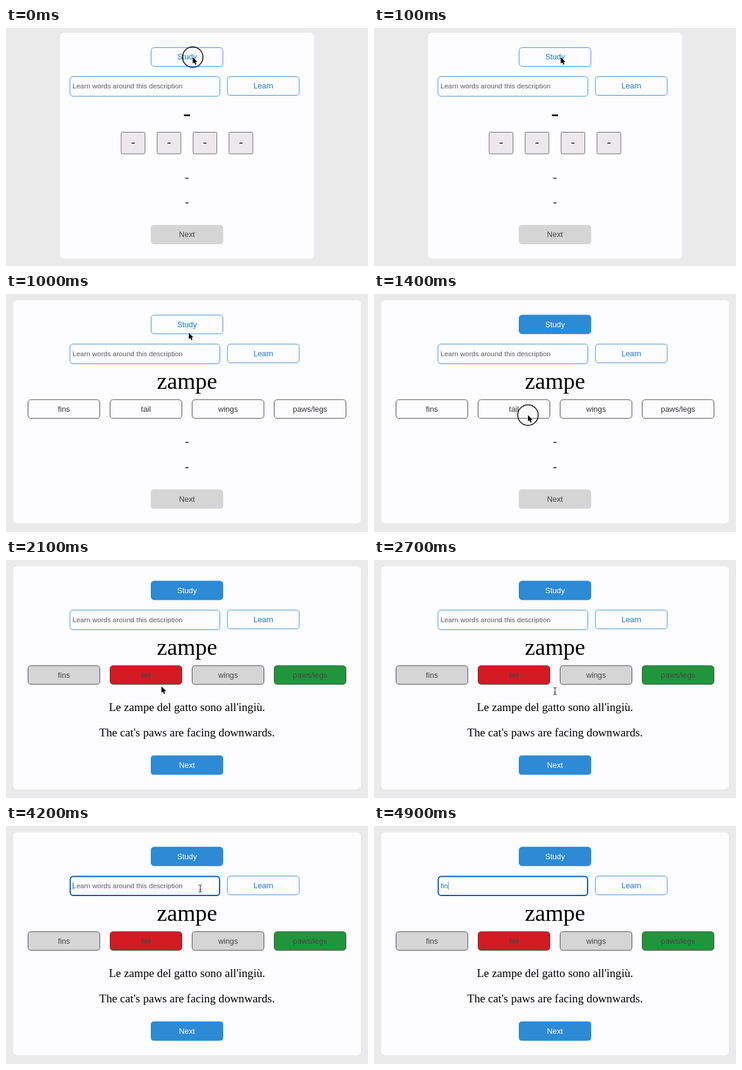
Animation of 600x394 px, one loop 5 s. Source, as an HTML page with a canvas:

```html
<!DOCTYPE html>
<html lang="en">
<head>
<meta charset="utf-8">
<title>Word study</title>
<style>
html, body { margin: 0; width: 100%; height: 100%; overflow: hidden; background: #ebeaeb; }
canvas { display: block; width: 600px; height: 394px; }
</style>
</head>
<body>
<canvas id="stage"></canvas>
<script>
const W = 600, H = 394, LOOP = 5000, STEP = 100;
const SANS = '"Liberation Sans", Arial, sans-serif';
const SERIF = '"Liberation Serif", Times, serif';
const BLUE = '#2d8ad4', LINK = '#1279ca', PAPER = '#fdfcfe', GREY = '#d6d5d6';
const INK = '#333', FADED = '#484648';

const canvas = document.getElementById('stage');
const ctx = canvas.getContext('2d');
const ratio = window.devicePixelRatio || 1;
canvas.width = W * ratio;
canvas.height = H * ratio;

// Moments in ms
const LOADED = 200, ANSWERED = 1500, FOCUSED = 4100, TYPING = 4700;
const CLICKS = [0, 1400, 4100];

// Pointer stops: time, x, y
const PATH = [
  [0, 309.5, 48.3], [500, 309.5, 48.3], [700, 308.5, 48.3], [900, 308.5, 48.3],
  [1400, 255.2, 200.5], [1500, 255.2, 200.5], [2100, 257.7, 209.3],
  [2700, 300, 217], [3400, 354, 221], [4100, 322, 103.5], [LOOP, 322, 103.5]
];

function pointerAt(t) {
  const i = Math.max(1, PATH.findIndex(p => p[0] >= t));
  const [t0, x0, y0] = PATH[i - 1], [t1, x1, y1] = PATH[i];
  const k = (t - t0) / (t1 - t0);
  const e = k * k * (3 - 2 * k);
  return { x: x0 + (x1 - x0) * e, y: y0 + (y1 - y0) * e };
}

function inside(p, x, y, w, h) {
  return p.x >= x && p.x <= x + w && p.y >= y && p.y <= y + h;
}

function box(x, y, w, h, r, fill, stroke, line = 1) {
  const d = stroke ? line / 2 : 0;
  ctx.beginPath();
  ctx.roundRect(x + d, y + d, w - 2 * d, h - 2 * d, r);
  if (fill) { ctx.fillStyle = fill; ctx.fill(); }
  if (stroke) { ctx.strokeStyle = stroke; ctx.lineWidth = line; ctx.stroke(); }
}

function label(text, x, y, size, family, color, align = 'center') {
  ctx.font = `${size}px ${family}`;
  ctx.fillStyle = color;
  ctx.textAlign = align;
  ctx.fillText(text, x, y);
}

function button(text, x, y, fill, stroke, color) {
  box(x, y, 120, 32, 5, fill, stroke);
  label(text, x + 60, y + 20.3, 12.8, SANS, color);
}

function drawInput(t, y) {
  const focused = t >= FOCUSED;
  box(105.5, y, 249.5, 33.5, 5, PAPER, focused ? '#0d58ae' : '#3a93da', focused ? 2 : 1);
  const typed = 'fin'.slice(0, Math.max(0, Math.floor((t - TYPING) / STEP) + 1));
  const base = y + 20.3;
  if (typed) label(typed, 110.3, base, 11.52, SANS, LINK, 'left');
  else label('Learn words around this description', 110.3, base, 11.52, SANS, '#5d5b5e', 'left');
  if (focused) {
    ctx.fillStyle = BLUE;
    ctx.fillRect(110.5 + (typed ? ctx.measureText(typed).width : 0), y + 10, 1, 13);
  }
}

function drawChoices(answered) {
  ['fins', 'tail', 'wings', 'paws/legs'].forEach((word, i) => {
    const x = 36 + i * 136;
    const fill = answered ? [GREY, '#d41a22', GREY, '#20963c'][i] : PAPER;
    button(word, x, 174.4, fill, '#4b494b', answered ? FADED : INK);
    if (answered && i === 1) {
      const w = ctx.measureText(word).width;
      ctx.fillRect(x + 60 - w / 2, 190.4, w, 1);
    }
  });
}

function drawPage(t, pointer) {
  const loaded = t >= LOADED, answered = t >= ANSWERED;
  const top = loaded ? 34.4 : 32;
  ctx.fillStyle = '#ebeaeb';
  ctx.fillRect(0, 0, W, H);
  if (loaded) box(12, 10.4, 576, 369.2, 6, PAPER);
  else box(89.6, 8, 420.8, 374, 6, PAPER);

  const hover = inside(pointer, 240, top, 120, 32);
  button('Study', 240, top, hover ? PAPER : BLUE, hover ? '#3a93da' : BLUE, hover ? LINK : '#fff');
  drawInput(t, top + 48);
  button('Learn', 366.5, top + 48, PAPER, '#3a93da', LINK);

  label(loaded ? 'zampe' : '-', 300, loaded ? 157 : 154, 38.4, SERIF, '#000');
  if (loaded) drawChoices(answered);
  else for (let i = 0; i < 4; i++) {
    const x = 190.4 + i * 59.6;
    box(x, 172, 40.4, 36.8, 2, '#ebe9eb', '#6b696b');
    label('-', x + 20.2, 195, 19.2, SERIF, '#000');
  }

  const line = loaded ? 250.4 : 252.6;
  label(answered ? "Le zampe del gatto sono all'ingiù." : '-', 300, line, 19.2, SERIF, '#000');
  label(answered ? "The cat's paws are facing downwards." : '-', 300, line + 41.2, 19.2, SERIF, '#000');
  button('Next', 240, loaded ? 323.6 : 326, answered ? BLUE : GREY, null, answered ? '#fff' : FADED);
}

function drawArrow({ x, y }) {
  ctx.beginPath();
  [[0, 0], [0, 10.6], [2.4, 8.4], [4.2, 12.4], [6.1, 11.6], [4.4, 7.7], [7.6, 7.7]]
    .forEach(([dx, dy]) => ctx.lineTo(x + dx, y + dy));
  ctx.closePath();
  ctx.lineJoin = 'round';
  ctx.lineWidth = 1.6;
  ctx.strokeStyle = '#fff';
  ctx.stroke();
  ctx.fillStyle = '#000';
  ctx.fill();
}

function drawBeam({ x, y }) {
  ctx.beginPath();
  for (const s of [-1, 1]) {
    ctx.moveTo(x - 2.6, y + 6 * s);
    ctx.quadraticCurveTo(x, y + 6 * s, x, y + 4.4 * s);
    ctx.quadraticCurveTo(x, y + 6 * s, x + 2.6, y + 6 * s);
  }
  ctx.moveTo(x, y - 5);
  ctx.lineTo(x, y + 5);
  ctx.moveTo(x - 1.5, y + 2);
  ctx.lineTo(x + 1.5, y + 2);
  for (const [color, width] of [['#fff', 2.4], ['#222', 1]]) {
    ctx.strokeStyle = color;
    ctx.lineWidth = width;
    ctx.stroke();
  }
}

function drawPointer(t, pointer) {
  if (t >= TYPING) return;
  const overText = pointer.y > 214 || inside(pointer, 106, 83, 249, 33) ||
    inside(pointer, 250, 128, 100, 40);
  (overText ? drawBeam : drawArrow)(pointer);
  if (CLICKS.includes(t)) {
    ctx.beginPath();
    ctx.arc(pointer.x, pointer.y, 17, 0, Math.PI * 2);
    ctx.strokeStyle = '#111';
    ctx.lineWidth = 1.5;
    ctx.stroke();
  }
}

const start = performance.now();

function render() {
  const elapsed = Math.max(0, performance.now() - start) % LOOP;
  const t = Math.floor(elapsed / STEP) * STEP;
  const pointer = pointerAt(t);
  ctx.setTransform(ratio, 0, 0, ratio, 0, 0);
  drawPage(t, pointer);
  drawPointer(t, pointer);
  requestAnimationFrame(render);
}
render();
</script>
</body>
</html>
```
